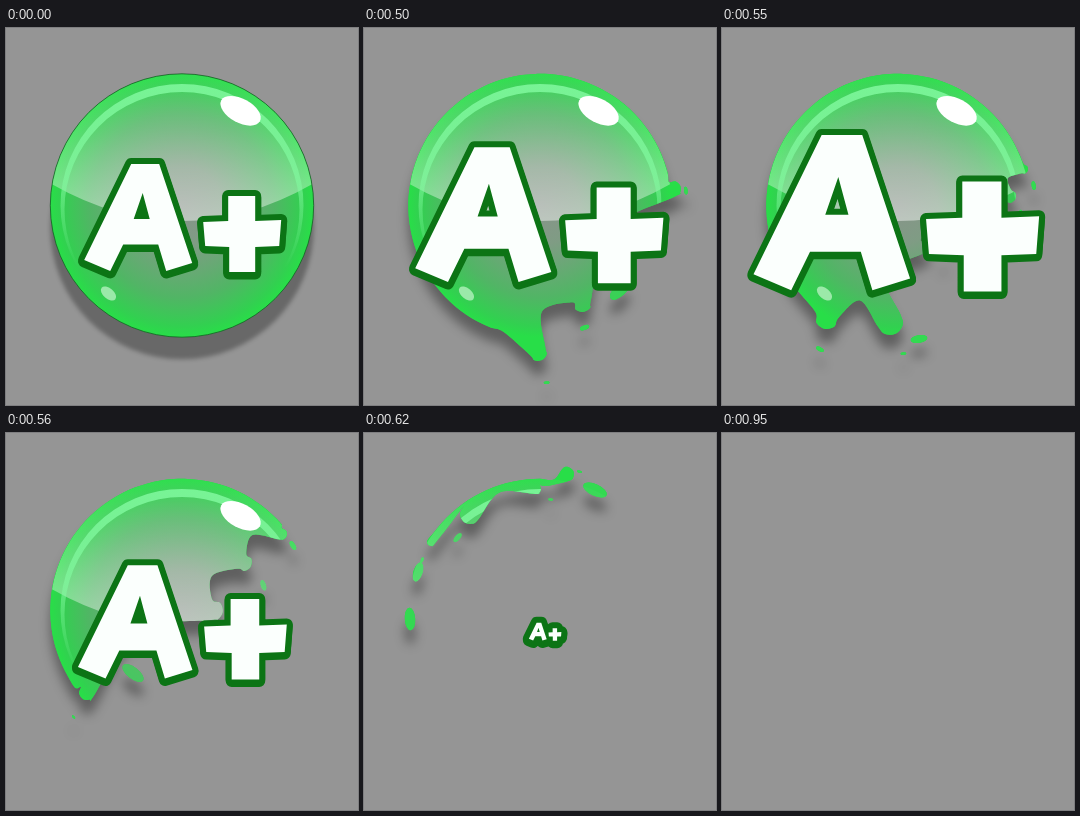
Animation, 352 px wide and 377 px high, one loop 1150 ms. Source, as an HTML page with a canvas:

```html
<!DOCTYPE html>
<html lang="en">
<head>
<meta charset="utf-8">
<title>Bubble pop</title>
<style>
html, body { margin: 0; width: 100%; height: 100%; overflow: hidden; background: #959595; }
canvas { display: block; }
</style>
</head>
<body>
<canvas id="stage" width="352" height="377" role="img" aria-label="A+"></canvas>
<script>
const ctx = document.getElementById('stage').getContext('2d');
const W = 352, H = 377, CX = 176, CY = 177.5, R = 131.7;
const HOLD = 500, STEP = 30, LOOP = 1150;
const TAU = Math.PI * 2, DEG = TAU / 360;

// Size of the lettering at each step of the pop
const sizes = [1, 1.26, 1.45, 1.06, .48, .165];

// rim: part of the circle still standing, in degrees
// lobes: round tips of the torn edge, x, y, radius
// drops: large loose drops, x, y, radius
const tears = [
  { rim: [106, 346], lobes: [[309,161,8], [218,274,10], [174,324,9]], drops: [[256,262,9]] },
  { rim: [137, 337], lobes: [[301,141,5], [287,168,7], [252,200,6], [200,219,8], [168,294,13], [105,289,12]],
    drops: [[197,311,6]] },
  { rim: [144, 319], lobes: [[275,101,6], [237,129,9], [206,177,11], [81,259,8]], drops: [[127,240,9]] },
  { rim: [184, 298], lobes: [[250,67,7], [212,72,6], [187,88,8], [141,122,17], [78,142,15], [46,187,8]],
    drops: [[270,135,9], [293,146,5]] },
  { rim: [216, 276], lobes: [[203,41,7], [172,56,5], [106,81,10], [67,109,4]],
    drops: [[231,57,9], [54,139,7], [46,186,8]] }
];

function randoms(seed) {
  return () => (seed = (seed * 16807) % 2147483647) / 2147483647;
}

const onCircle = (x, y, r, a) => [x + r * Math.cos(a), y + r * Math.sin(a)];
const middle = (p, q) => [(p[0] + q[0]) / 2, (p[1] + q[1]) / 2];

// Scoop between two lobes, kept inside the rim
function bay(p, q) {
  const dx = q[0] - p[0], dy = q[1] - p[1], len = Math.hypot(dx, dy);
  const depth = Math.min(24, .5 * (len - p[2] - q[2])) / len;
  const [mx, my] = middle(p, q);
  const x = mx - dy * depth - CX, y = my + dx * depth - CY;
  const k = Math.min(1, (R - 7) / Math.hypot(x, y));
  return [CX + x * k, CY + y * k];
}

// Closed Catmull-Rom curve
function smooth(path, pts) {
  const n = pts.length, p = i => pts[(i + n) % n];
  path.moveTo(...pts[0]);
  for (let i = 0; i < n; i++) {
    const [a, b, c, d] = [p(i - 1), p(i), p(i + 1), p(i + 2)];
    path.bezierCurveTo(
      b[0] + (c[0] - a[0]) / 6, b[1] + (c[1] - a[1]) / 6,
      c[0] - (d[0] - b[0]) / 6, c[1] - (d[1] - b[1]) / 6, ...c);
  }
  path.closePath();
}

// Loose drops are stretched along the direction of the rim
function addDrop(path, x, y, r) {
  const turn = Math.atan2(y - CY, x - CX) + TAU / 4;
  path.moveTo(...onCircle(x, y, r * 1.4, turn));
  path.ellipse(x, y, r * 1.4, r * .65, turn, 0, TAU);
}

function tear({ rim: [from, to], lobes, drops }, seed) {
  const shape = new Path2D(), loose = new Path2D(), pts = [];
  const rand = randoms(seed);
  const n = Math.ceil((to - from) / 6);
  for (let i = 0; i <= n; i++) pts.push(onCircle(CX, CY, R, (from + (to - from) * i / n) * DEG));

  let before = pts[n];
  lobes.forEach((lobe, i) => {
    const [x, y, r] = lobe, last = i === lobes.length - 1;
    const after = last ? pts[0] : bay(lobe, lobes[i + 1]);
    const root = middle(before, after);
    const axis = Math.atan2(y - root[1], x - root[0]);
    for (let a = -100; a <= 100; a += 50) pts.push(onCircle(x, y, r, axis + a * DEG));
    if (!last) pts.push(after);
    before = after;

    // one small drop flung from each tip, falling a little
    const [fx, fy] = onCircle(x, y, r + 10, axis);
    addDrop(loose, fx + rand() * 10 - 5, fy + 5 + rand() * 10, 1.5 + rand() * 2.5);
  });
  smooth(shape, pts);
  drops.forEach(drop => addDrop(loose, ...drop));
  shape.addPath(loose);
  return { shape, loose };
}

const whole = new Path2D();
whole.arc(CX, CY, R, 0, TAU);
const bodies = [{ shape: whole }, ...tears.map((t, i) => tear(t, 4177 * (i + 3)))];

function shades(gradient, stops) {
  stops.forEach(([at, color]) => gradient.addColorStop(at, color));
  return gradient;
}

const bodyTint = shades(ctx.createRadialGradient(CX, CY, 0, CX, CY, R),
  [[0, '#88948a'], [.3, '#7f9c84'], [.7, '#51b565'], [.92, '#32d050'], [1, '#28de48']]);
const glossTint = shades(ctx.createLinearGradient(0, 45, 0, 193),
  [[0, 'rgba(255,255,255,.03)'], [.4, 'rgba(255,255,255,.18)'], [1, 'rgba(255,255,255,.46)']]);
const rimTint = shades(ctx.createLinearGradient(0, 55, 0, 240),
  [[0, 'rgba(130,250,160,.85)'], [.5, 'rgba(130,250,160,.65)'], [1, 'rgba(130,250,160,0)']]);

function oval(x, y, rx, ry, turn, color) {
  ctx.fillStyle = color;
  ctx.beginPath();
  ctx.ellipse(x, y, rx, ry, turn, 0, TAU);
  ctx.fill();
}

function paintBody() {
  ctx.fillStyle = bodyTint;
  ctx.fillRect(0, 0, W, H);

  ctx.fillStyle = glossTint;
  ctx.beginPath();
  ctx.moveTo(45.5, 156);
  ctx.quadraticCurveTo(CX, 230, 306.5, 156);
  ctx.arc(CX, CY, R, -.163, Math.PI + .163, true);
  ctx.fill();

  ctx.fillStyle = rimTint;
  ctx.beginPath();
  ctx.arc(CX, CY, 121.5, 0, TAU);
  ctx.moveTo(CX + 117.5, CY + 4);
  ctx.arc(CX, CY + 4, 117.5, 0, TAU);
  ctx.fill('evenodd');

  oval(234.6, 82.8, 22, 12, .5, '#fff');
  oval(102.5, 265.5, 9, 5.2, .7, '#9be9a9');
}

function drawBody({ shape, loose }) {
  ctx.save();
  ctx.shadowColor = loose ? 'rgba(0,0,0,.36)' : 'rgba(0,0,0,.3)';
  ctx.shadowOffsetY = loose ? 14 : 22;
  ctx.shadowBlur = loose ? 11 : 4;
  ctx.fillStyle = '#2bd64b';
  ctx.fill(shape);
  ctx.restore();

  ctx.save();
  ctx.clip(shape);
  paintBody();
  if (loose) {
    ctx.fillStyle = 'rgba(60,215,90,.55)';
    ctx.fill(loose);
  }
  ctx.restore();

  if (!loose) {
    ctx.strokeStyle = 'rgba(20,75,32,.7)';
    ctx.lineWidth = 1;
    ctx.stroke(shape);
  }
}

const letterA = [[125,135], [153,135], [186,234], [160,242], [152,215.5], [117,215.5], [104,242], [78,231]];
const hole = [[136.5,164], [127.5,190], [143.5,190]];
const plus = [[222,167], [249,167], [249,192], [275,191], [273,217], [249,218],
  [249,243], [223,243], [223,218], [199,217], [197,193], [222,192]];

function drawGrade(size) {
  const x0 = 182 - 5.3 * size, y0 = 200.5 - 10.5 * size;
  const path = new Path2D();
  for (const part of [letterA, hole, plus]) {
    for (const [x, y] of part) path.lineTo(x0 + (x - 176.5) * size, y0 + (y - 189) * size);
    path.closePath();
    path.moveTo(0, 0);
    if (part === plus) break;
    const next = part === letterA ? hole[0] : plus[0];
    path.moveTo(x0 + (next[0] - 176.5) * size, y0 + (next[1] - 189) * size);
  }
  ctx.lineJoin = 'round';
  ctx.lineWidth = 12;
  ctx.strokeStyle = '#0c7415';
  ctx.stroke(path);
  ctx.save();
  ctx.translate(0, 1.5);
  ctx.stroke(path);
  ctx.restore();
  ctx.fillStyle = '#fbfffd';
  ctx.fill(path, 'evenodd');
}

function draw(t) {
  ctx.fillStyle = '#959595';
  ctx.fillRect(0, 0, W, H);
  const step = t < HOLD ? 0 : 1 + Math.floor((t - HOLD) / STEP);
  if (step >= bodies.length) return;
  drawBody(bodies[step]);
  drawGrade(sizes[step]);
}

const start = performance.now();
function tick() {
  draw((performance.now() - start) % LOOP);
  requestAnimationFrame(tick);
}
tick();
</script>
</body>
</html>
```
